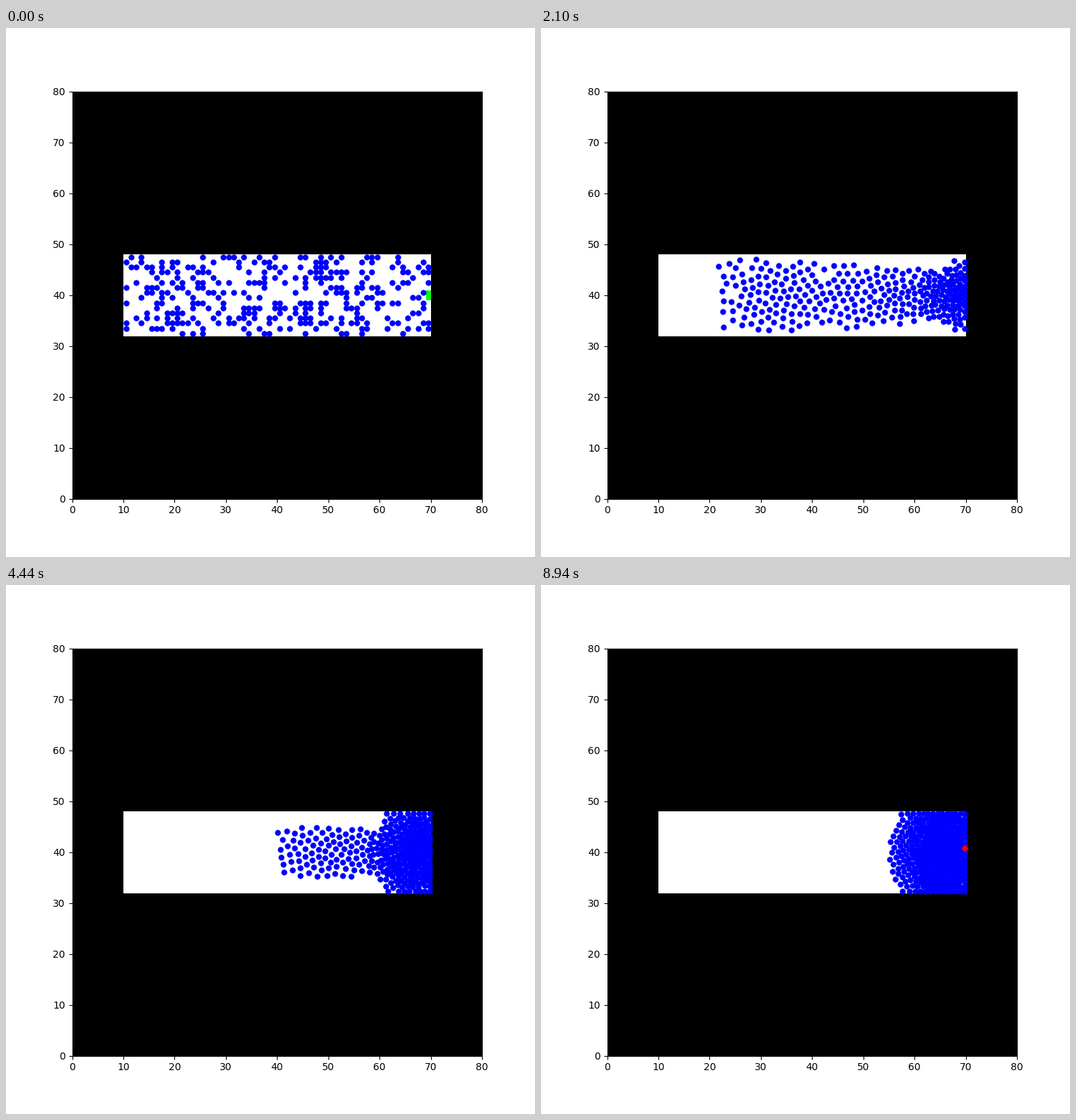
A matplotlib script that plays this animation: 748 by 748 pixels, repeating every 9000 ms.

```python
import numpy as np
import matplotlib.pyplot as plt
from matplotlib.animation import FuncAnimation

SIZE, DPI = 748, 100
FRAMES, INTERVAL = 150, 60
GRID = 80
X0, X1, Y0, Y1 = 10, 70, 32, 48       # corridor
EXIT_Y = (39, 41)
TARGET = np.array([69.5, 40.0])

COUNT = 300
SPEED, RELAX = 0.4875, 10.4           # cells per frame, frames
PUSH, RANGE = 36.0, 0.17              # repulsion strength and decay length
SUBSTEPS = 5
LOW = np.array([X0 + 0.3, Y0 + 0.35])
HIGH = np.array([X1 - 0.3, Y1 - 0.4])
RED_FROM, RED_SPOT = 90, np.array([69.7, 40.75])


def make_floor():
    floor = np.zeros((GRID, GRID, 3))
    floor[Y0:Y1, X0:X1] = 1
    floor[EXIT_Y[0]:EXIT_Y[1], X1 - 1] = (0, 1, 0)
    return floor


def start_positions():
    rng = np.random.default_rng(12)
    cells = np.array([(x + 0.5, y + 0.5)
                      for x in range(X0, X1) for y in range(Y0, Y1)
                      if not (x == X1 - 1 and EXIT_Y[0] <= y < EXIT_Y[1])])
    return cells[rng.choice(len(cells), COUNT, replace=False)]


def repulsion(pos):
    dx = pos[:, 0, None] - pos[:, 0]
    dy = pos[:, 1, None] - pos[:, 1]
    dist = np.sqrt(dx * dx + dy * dy)
    np.fill_diagonal(dist, 1e3)
    dist = np.maximum(dist, 0.1)
    force = PUSH * np.exp(-dist / RANGE) / dist
    return np.column_stack([(force * dx).sum(1), (force * dy).sum(1)])


def simulate():
    pos = start_positions()
    vel = np.zeros_like(pos)
    track = [pos.copy()]
    dt = 1 / SUBSTEPS
    red = None
    for frame in range(1, FRAMES):
        if frame == RED_FROM:
            red = np.argmin(np.hypot(*(pos - RED_SPOT).T))
        for _ in range(SUBSTEPS):
            way = TARGET - pos
            way /= np.maximum(np.hypot(way[:, 0], way[:, 1]), 0.5)[:, None]
            vel += dt * ((SPEED * way - vel) / RELAX + repulsion(pos))
            pos = pos + dt * vel
            vel[(pos < LOW) | (pos > HIGH)] = 0
            pos = np.clip(pos, LOW, HIGH)
            if red is not None:
                pos[red] = RED_SPOT
                vel[red] = 0
        track.append(pos.copy())
    return track, red


track, red = simulate()

fig, ax = plt.subplots(figsize=(SIZE / DPI, SIZE / DPI), dpi=DPI)
ax.imshow(make_floor(), origin="lower", extent=(0, GRID, 0, GRID),
          aspect="auto", interpolation="nearest")
ax.set_xlim(0, GRID)
ax.set_ylim(0, GRID)
ax.set_xticks(range(0, GRID + 1, 10))
ax.set_yticks(range(0, GRID + 1, 10))

style = dict(ls="", marker="o", ms=6, mew=0)
crowd, = ax.plot([], [], color="blue", **style)
fallen, = ax.plot([], [], color="red", zorder=3, **style)


def draw(frame):
    pos = track[frame]
    crowd.set_data(pos[:, 0], pos[:, 1])
    shown = pos[[red]] if frame >= RED_FROM else pos[:0]
    fallen.set_data(shown[:, 0], shown[:, 1])
    return crowd, fallen


anim = FuncAnimation(fig, draw, frames=FRAMES, interval=INTERVAL,
                     init_func=lambda: draw(0), repeat=True, repeat_delay=0)
plt.show()
```
